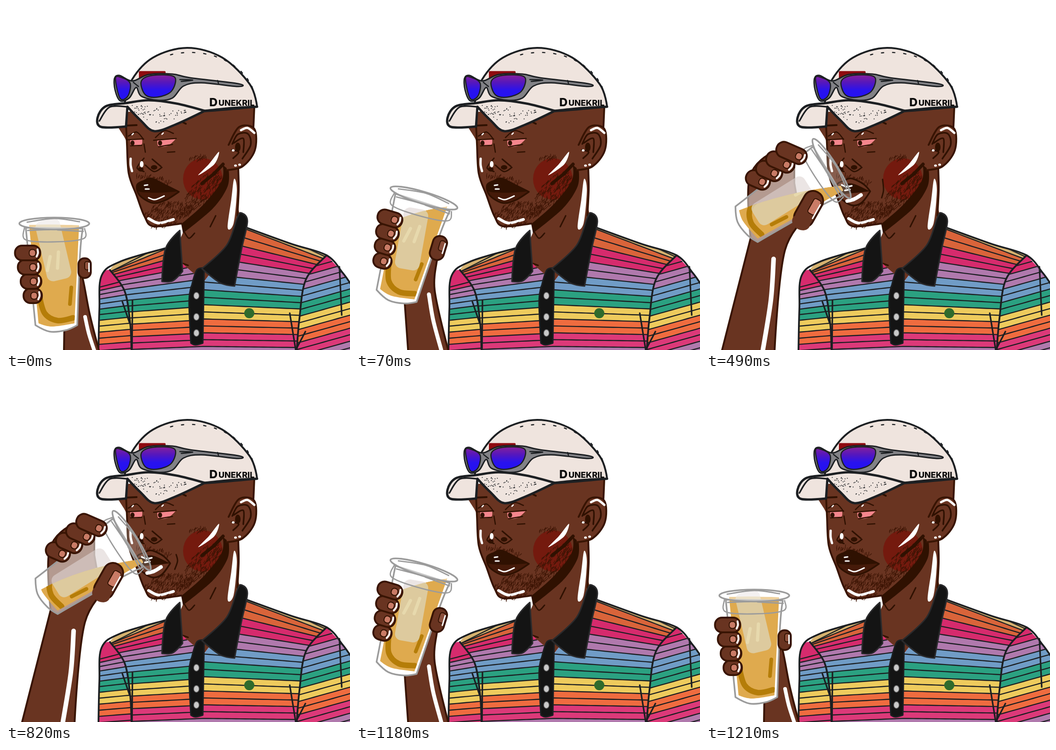
An HTML page with a canvas that plays this animation: 748 by 748 pixels, repeating every 1280 ms.

```html
<!DOCTYPE html>
<html lang="en">
<head>
<meta charset="utf-8">
<title>Sip</title>
<style>
html, body { margin: 0; width: 100%; height: 100%; overflow: hidden; background: #fff; }
canvas { display: block; width: 100vw; height: 100vh; }
</style>
</head>
<body>
<canvas id="stage" width="748" height="748"></canvas>
<script>
const ctx = document.getElementById('stage').getContext('2d');
const SKIN = '#693421', EDGE = '#381403', DARK = '#2f1101', INK = '#1c1f22';
const CAP = '#efe4de', GLASS = '#9b9b9b', NAIL = '#c97b66', PINK = '#f4868d', WHITE = '#fff';
ctx.lineCap = ctx.lineJoin = 'round';

let seed = 1;
const rnd = () => (seed = seed * 16807 % 2147483647) / 2147483647;
const mix = (a, b, t) => a + (b - a) * t;

// Smooth path through "x,y" points; a trailing "!" makes a corner.
function parse(s) {
  return s.split(' ').map(w => {
    const [x, y] = w.replace('!', '').split(',').map(Number);
    return { x, y, hard: w.endsWith('!') };
  });
}
function trace(src, closed) {
  const p = typeof src === 'string' ? parse(src) : src, n = p.length, path = new Path2D();
  const at = i => closed ? p[(i + n) % n] : p[Math.max(0, Math.min(n - 1, i))];
  path.moveTo(p[0].x, p[0].y);
  for (let i = 0; i < (closed ? n : n - 1); i++) {
    const a = at(i - 1), b = at(i), c = at(i + 1), d = at(i + 2);
    const k = b.hard ? 0 : 1 / 6, m = c.hard ? 0 : 1 / 6;
    path.bezierCurveTo(b.x + (c.x - a.x) * k, b.y + (c.y - a.y) * k,
      c.x - (d.x - b.x) * m, c.y - (d.y - b.y) * m, c.x, c.y);
  }
  return path;
}
function paint(path, fill, stroke, w = 4) {
  if (fill) { ctx.fillStyle = fill; ctx.fill(path); }
  if (stroke) { ctx.strokeStyle = stroke; ctx.lineWidth = w; ctx.stroke(path); }
}
const shape = (s, fill, stroke, w) => paint(trace(s, true), fill, stroke, w);
const lines = (s, color, w) => s.split('|').forEach(l => paint(trace(l), null, color, w));
function oval(x, y, rx, ry, fill, stroke, w, turn = 0) {
  const p = new Path2D();
  p.ellipse(x, y, rx, ry, turn, 0, Math.PI * 2);
  paint(p, fill, stroke, w);
}
// Rounded box around a centre.
function pill(x, y, w, h, r, fill, stroke, lw) {
  const p = new Path2D();
  p.roundRect(x - w / 2, y - h / 2, w, h, r);
  paint(p, fill, stroke, lw);
}
function at(x, y, turn, body) {
  ctx.save();
  ctx.translate(x, y);
  ctx.rotate(turn);
  body();
  ctx.restore();
}
// Short hairs scattered over a turned ellipse.
function hairs(x, y, rx, ry, turn, n) {
  at(x, y, turn, () => {
    for (let i = 0; i < n; i++) {
      const a = rnd() * 7, r = Math.sqrt(rnd()), lean = 2 - turn + rnd() - .5;
      const hx = Math.cos(a) * r * rx, hy = Math.sin(a) * r * ry;
      lines(`${hx},${hy} ${hx + 6 * Math.cos(lean)},${hy + 6 * Math.sin(lean)}`, '#3d1505', 1.2);
    }
  });
}

// Stripes: even rows that fan out toward the shoulders.
const BANDS = ['#d6b26f', '#d9643a', '#d62b6d', '#b079ad', '#709cc6', '#2ba181', '#eecb5d', '#ef6c3f', '#dc3979', '#b079ad'];
const rowY = k => 515 + 28.4 * k;
const fan = k => .38 * .65 ** k;
const ZONES = {
  chest: (x, k) => rowY(k) + (x < 430 ? (fan(k) + .03) * (380 - x) : fan(k) * (x - 600)),
  leftSleeve: (x, k) => rowY(k) + 8 + (fan(k) + .06) * (380 - x),
  rightSleeve: (x, k) => rowY(k) + 3 - .28 * (x - 690)
};
function stripes(area, edge, first) {
  ctx.save();
  ctx.clip(area);
  ctx.fillStyle = BANDS[first];
  ctx.fillRect(190, 440, 558, 308);
  const row = k => {
    const p = new Path2D();
    for (let x = 190; x <= 750; x += 10) p.lineTo(x, edge(x, k));
    return p;
  };
  for (let k = first; k < 9; k++) {
    const p = row(k);
    p.lineTo(750, 800);
    p.lineTo(190, 800);
    paint(p, BANDS[k + 1]);
  }
  for (let k = first - .5; k < 9; k += .5) paint(row(k), null, INK, 2.4);
  ctx.restore();
}

function shirt() {
  const left = '345,527 250,555 208,586 203,660 201,752', right = '523,482 620,517 697,542 732,580 752,608';
  const seamL = '226,574 258,620 270,690 273,752', seamR = '697,542 652,595 638,680 632,752';
  const chest = trace('345,527! 250,555 226,574! 258,620 270,690 273,752! 632,752! 638,680 652,595 697,542! 620,517 523,482! 430,600!', true);
  stripes(chest, ZONES.chest, 0);
  stripes(trace('226,574! 208,586 203,660 201,752! 273,752! 270,690 258,620', true), ZONES.leftSleeve, 2);
  stripes(trace('697,542! 732,580 752,608! 752,752! 632,752! 638,680 652,595', true), ZONES.rightSleeve, 2);
  lines([left, right, seamL, seamR].join('|'), INK, 3.8);
  lines('275,641 274,750|253,643 269,690|725,567 730,672|617,668 630,748|651,708 630,748', INK, 3.4);
  shape('378,488! 347,527 339,599! 362,598 384,577! 380,520', '#141414', '#2a2a2c', 3);
  shape('404,607! 415,574 431,570! 428,733! 412,737 402,733! 398,640', '#141414', INK, 3);
  shape('512,450 525,468 512,530 497,609! 466,602 426,571! 480,520 503,460', '#141414', '#2a2a2c', 3);
  [630, 676, 711].forEach(y => oval(414, y, 6, 7.5, '#c9c9c9', '#555', 1.5));
  oval(529, 668, 11, 11, '#2f6b2c');
}

function neck() {
  shape('383,470! 386,490! 358,555! 402,622! 480,590! 512,470! 505,440! 505,345! 440,340!', SKIN);
  lines('505,352 506,400 503,456', EDGE, 4);
  lines('388,492 398,505 410,494|456,456 444,480|385,560 396,564', DARK, 3);
}

function ear() {
  shape('480,357! 484,300 507,263 540,267 541,314 514,349', SKIN);
  lines('484,302 507,263 540,267 541,314 514,349 480,357', EDGE, 4);
  lines('492,300 504,279 526,278 532,302 514,332|495,298 516,288 516,318|491,313 506,318 494,331', DARK, 3.5);
  oval(504, 307, 6, 10, DARK);
  lines('511,270 525,265 540,276', WHITE, 5);
  [[494, 314], [508, 345], [499, 347]].forEach(([x, y]) => oval(x, y, 3, 2.5, WHITE));
}

function head() {
  const face = '260,232 263,300 267,365 284,412 301,457 320,479 382,473';
  shape(face + '! 476,357! 505,345! 540,300! 540,215!', SKIN);
  oval(428, 376, 43, 45, '#741a0e');
  hairs(355, 445, 52, 21, -.15, 210);
  hairs(430, 400, 52, 24, -.8, 200);
  hairs(322, 374, 40, 9, .2, 50);
  hairs(420, 328, 20, 6, -.1, 22);
  shape('381,474! 430,431 469,380 471,345! 484,356! 482,392 450,440 385,494!', DARK);
  lines(face + '|540,218 538,264', EDGE, 4);
  ear();
  lines('426,386 452,365|452,365 472,344', DARK, 7);
  shape('463,317 453,344 418,368 441,344', WHITE);
  shape('496,376 502,400 495,472 482,482 490,420', WHITE);

  // Brows and eyes
  lines('263,260 284,259|383,252 391,256', DARK, 4);
  shape('270,291! 296,290! 294,302 273,304', PINK);
  shape('329,292! 369,289! 352,304 332,305', PINK);
  [275, 335].forEach(x => oval(x, 298, 4.5, 5.5, DARK));
  lines('263,291 299,289|266,283 284,274 299,290|271,304 295,303|321,292 370,288|325,286 344,271 364,277|332,306 362,301|351,318 367,317|300,300 303,318', DARK, 2.6);
  lines('339,279 342,276|274,280 277,277', WHITE, 2.5);

  // Nose
  lines('300,331 285,352 300,360|303,346 322,360 339,351|318,333 337,349', DARK, 3);
  oval(322, 351, 7, 5, DARK);
  oval(293, 355, 6, 5, DARK);
  oval(295, 344, 4, 7, WHITE);
  lines('271,332 271,346 274,359', WHITE, 5);

  // Chin
  lines('310,462 332,472 364,464', WHITE, 6);
  hairs(345, 474, 30, 4, -.2, 30);
}

function cap() {
  shape('258,212! 274,160 320,112 394,91 470,112 530,170 546,219! 432,229 300,235', CAP, INK, 4);
  pill(318, 167, 58, 51, 2, '#8e0b10');
  shape('262,211 217,218 199,243 207,263 261,262! 264,219! 292,248 322,272 368,258 432,228! 370,212 310,205', CAP, INK, 5);
  lines('264,219 225,220 203,250', INK, 3.5);
  lines('432,228 490,222 546,219', INK, 5);
  for (let i = 0; i < 75; i++) {
    const u = rnd(), y = 212 + u * 14 + rnd() * 36 * Math.sin(Math.PI * (.12 + u * .85));
    oval(mix(272, 395, u), y, 1, 1, INK);
  }
  for (let a = -1.85; a < -.25; a += .17)
    at(400 + 143 * Math.cos(a), 213 + 112 * Math.sin(a), a, () => lines('0,-3 0,2', INK, 2.4));
  ctx.fillStyle = '#0c0c0c';
  ctx.font = '800 25px Inter, "DejaVu Sans", sans-serif';
  ctx.fillText('D', 442, 218);
  ctx.font = '800 18px Inter, "DejaVu Sans", sans-serif';
  ctx.fillText('UNEKRIL', 462, 217);
}

function shades() {
  const g = ctx.createLinearGradient(0, 150, 0, 200);
  ['#86209c', '#5517bd', '#2912ee', '#2411f2'].forEach((c, i) => g.addColorStop(i / 3, c));
  shape('236,157 247,151 275,163 310,149 362,148 400,156 505,169 503,175 425,167 386,174 362,200 330,205 294,196 283,177 268,200 248,206 237,182', '#828286', INK, 3);
  shape('238,158 250,155 270,168 265,196 248,201', g, INK, 2.6);
  shape('294,164 318,151 366,154 360,185 330,198 303,193', g, INK, 2.6);
  lines('378,160 406,161 381,164|460,162 462,168|277,166 288,175', INK, 2.6);
}

function mouth(open) {
  const top = '285,389 300,380 316,375 342,387';
  if (open) {
    shape(top + ' 357,403! 338,428 316,433 292,416', SKIN, DARK, 3.5);
    shape('287,392 318,386 356,403! 318,407 290,408', DARK);
    lines('295,389 306,393 317,391|302,401 313,399', WHITE, 3.5);
    lines('307,424 322,420 337,411', WHITE, 8);
    return;
  }
  shape(top + ' 376,404! 345,423 318,428 290,411', '#451a09', DARK, 3.5);
  shape(top + ' 374,403! 330,406 288,403', DARK);
  lines('301,390 308,389|303,398 311,398|310,417 324,421 344,413', WHITE, 3);
}

// Key poses of cup and arm; grip grows as the cup rises.
const REST = {
  grip: 0, x: 105, y: 472, turn: 0, iceX: 103, iceY: 530, iceTurn: -.23,
  wet: '40,476 105,474 170,477', shine: '172,676 180,712 193,752',
  arm: '126,752! 127,690! 158,600! 166,590 182,670 203,752!'
};
const NEAR = {
  grip: 1, x: 191, y: 361, turn: .585, iceX: 107, iceY: 602, iceTurn: 0,
  wet: '40,505 115,420 232,394', shine: '145,578 156,655 178,745',
  arm: '101,752! 82,560! 160,492! 188,488 160,565 200,752!'
};
const SIP = {
  grip: 2, x: 274, y: 353, turn: 1.012, iceX: 107, iceY: 602, iceTurn: 0,
  wet: '62,448 170,404 298,390', shine: '147,550 141,640 123,752', open: true,
  arm: '34,752! 97,505! 95,372 150,318 192,350! 192,385! 205,460! 238,437 172,530 149,752!'
};
function blend(a, b, t) {
  const out = {};
  for (const key in a) {
    if (typeof a[key] === 'number') { out[key] = mix(a[key], b[key], t); continue; }
    const q = parse(b[key]);
    out[key] = parse(a[key]).map((p, i) =>
      mix(p.x, q[i].x, t) + ',' + mix(p.y, q[i].y, t) + (p.hard ? '!' : '')).join(' ');
  }
  return out;
}
const POSES = {
  rest: REST, lift: blend(REST, NEAR, .5), near: { ...NEAR, open: true },
  sip: SIP, gulp: SIP, low: { ...SIP, wet: '70,463 160,412 298,393' }
};

function digit(x, y, w, h, turn, body) {
  at(x, y, turn, () => {
    pill(0, 0, w, h, Math.min(w, h) * .48, SKIN, EDGE, 4);
    body();
  });
}

function hand(grip) {
  const wrap = Math.max(0, grip - 1);
  for (let i = 3; i >= 0; i--) {
    const w = 55 - i * 5 + wrap * 14;
    digit(47 + i * 3.7 - wrap * 17, 537 + i * 31 - wrap * 8, w, 32 + wrap * 2, -.6 * wrap, () => {
      pill(w / 2 - 17, 0, 14, 15, 6, NAIL, DARK, 2);
      lines(`${w / 2 - 6},-8 ${w / 2 - 5},0 ${w / 2 - 8},8`, WHITE, 4);
    });
  }
  const w = 27 + 8 * grip, h = 43 + 20 * grip;
  digit(171 - 9 * grip, 570 - 4 * grip, w, h, -.5 * wrap, () => {
    if (grip >= 1) oval(0, h / 2 - 8, w / 2 - 1, 16, SKIN);
    pill(w / 5, -h / 8, w * .4, h * .42, 5, grip > 1 ? NAIL : '#8d503c', DARK, 2);
    lines(`${w / 2 - 4},${-h / 4} ${w / 2 - 4},${h / 6}`, WHITE, 3);
  });
}

function cup(pose) {
  const wall = trace('43,482! 64,694! 95,708 130,705 155,694! 161,540 167,484!', true);
  const inside = trace('50,474! 71,690! 100,697 149,690! 156,540 159,476!', true);
  const ice = color => at(pose.iceX, pose.iceY, pose.iceTurn, () => pill(0, 0, 54, 134, 14, color));
  at(pose.x, pose.y, pose.turn, () => {
    ctx.translate(-105, -472);
    const local = ctx.getTransform();

    // Glass wash below the lip
    ctx.save();
    ctx.beginPath();
    ctx.rect(0, 540, 200, 200);
    ctx.clip();
    paint(wall, pose.grip > 1 ? 'rgba(255,255,255,.5)' : WHITE);
    ctx.restore();
    ice('rgba(222,212,210,.6)');

    // Liquid: everything under the surface curve
    ctx.save();
    ctx.clip(inside);
    ctx.resetTransform();
    const [a, b, c] = parse(pose.wet), pool = new Path2D();
    pool.moveTo(a.x, a.y);
    pool.quadraticCurveTo(b.x, b.y, c.x, c.y);
    pool.lineTo(c.x, 748);
    pool.lineTo(a.x, 748);
    ctx.clip(pool);
    paint(pool, '#dfaa4e');
    ctx.setTransform(local);
    lines('72,628 84,668 112,684 146,678', '#b57d08', 12);
    lines('142,612 139,648', '#b57d08', 8);
    ice('rgba(221,208,172,.85)');
    lines('90,575 96,545|112,570 114,535', 'rgba(234,222,178,.8)', 7);
    ctx.restore();

    paint(wall, null, GLASS, 3.6);
    oval(105, 473, 76, 13, pose.grip > 1 ? 'rgba(255,255,255,.2)' : 'rgba(255,255,255,.45)', GLASS, 3.6);
    lines('46,470 105,462 160,469|40,482 42,508 100,513 168,506 171,484|47,488 95,486|112,487 168,490', GLASS, 2.8);
    hand(pose.grip);
  });
}

function draw(name) {
  const pose = POSES[name];
  seed = 4271;
  ctx.fillStyle = WHITE;
  ctx.fillRect(0, 0, 748, 748);
  neck();
  head();
  shirt();
  cap();
  shades();
  mouth(pose.open);
  if (pose.grip > 1) lines(name === 'gulp' ? '384,377 386,400 382,417' : '370,384 373,398 367,416', DARK, 3);
  shape(pose.arm, SKIN, EDGE, 4);
  lines(pose.shine, WHITE, 8 + pose.grip);
  cup(pose);
}

const STEPS = [[0, 'rest'], [70, 'lift'], [100, 'near'], [130, 'sip'], [490, 'gulp'], [820, 'low'], [1150, 'near'], [1180, 'lift'], [1210, 'rest']];
const start = performance.now();
let shown;
function tick(now) {
  const t = Math.max(0, now - start) % 1280;
  const name = STEPS.filter(s => s[0] <= t).pop()[1];
  if (name !== shown) draw(shown = name);
  requestAnimationFrame(tick);
}
tick(start);
</script>
</body>
</html>
```
